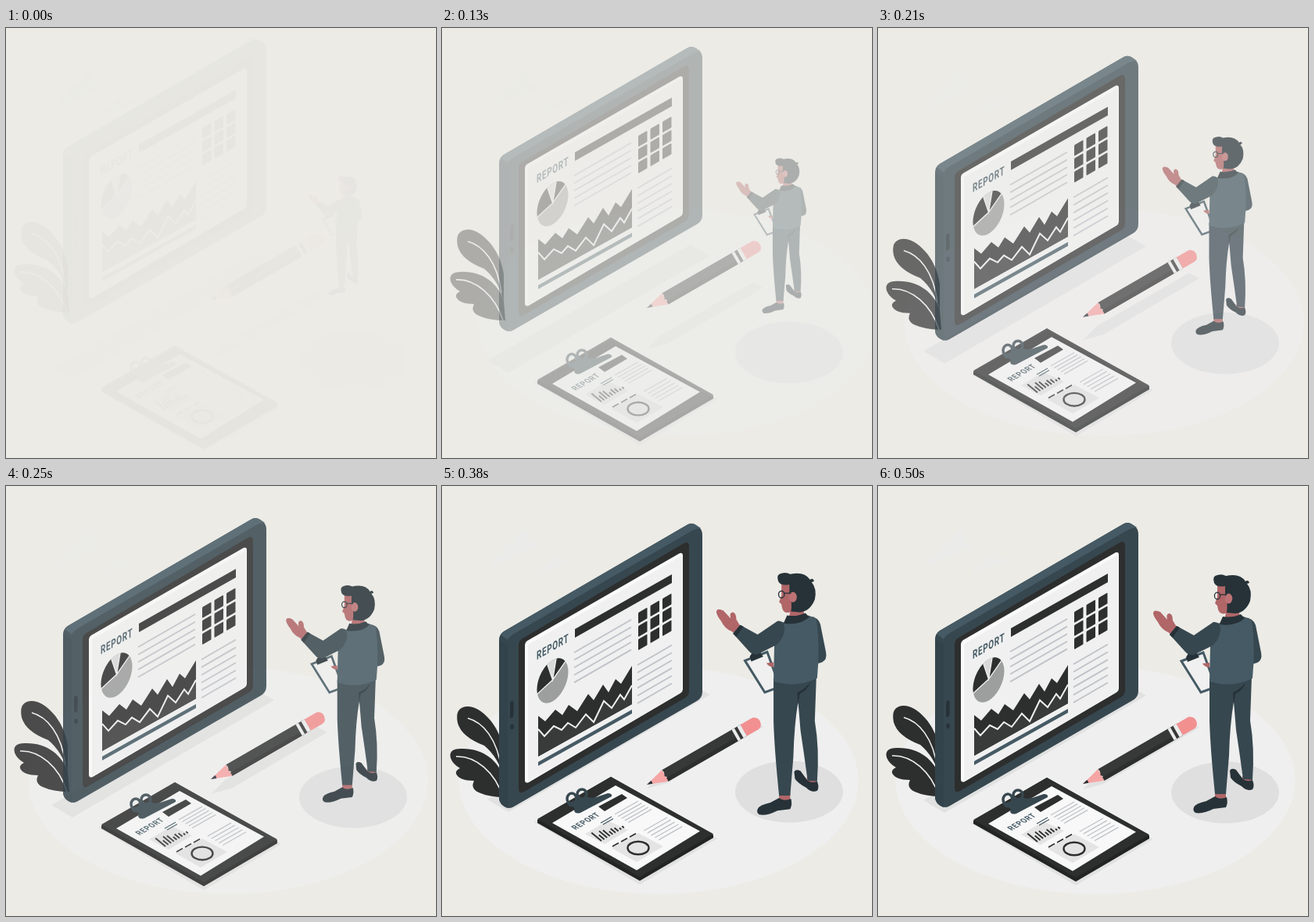
An HTML page with a canvas for the animation above (0.54 s loop, 550x550 px).

```html
<!DOCTYPE html>
<html lang="en">
<head>
<meta charset="utf-8">
<title>Report scene</title>
<style>
html, body { margin: 0; height: 100%; overflow: hidden; background: #ecebe6; }
canvas { display: block; width: 100vw; height: 100vh; }
</style>
</head>
<body>
<canvas id="stage" width="550" height="550"></canvas>
<script>
const SIZE = 550, LOOP = 540, TRAVEL = 33, ISO = 0.577;
const INK = '#2d2e2e', NAVY = '#263238', SLATE = '#37474f', STEEL = '#455a64';
const SKIN = '#b16668', PINK = '#f29090', LINE = '#bfc2c7', PAPER = '#f0f0f0';

// Each step: start time, eased progress.
const STEPS = [
  [0, 0], [40, .08], [80, .18], [130, .30], [170, .48], [210, .66], [250, .82],
  [290, .93], [330, .99], [380, 1.03], [420, 1.03], [460, 1.02], [500, 1]
];

const stage = document.getElementById('stage').getContext('2d');
const scratch = document.createElement('canvas');
scratch.width = scratch.height = SIZE;
const g = scratch.getContext('2d');

function fill(path, color) {
  g.fillStyle = color;
  g.fill(new Path2D(path));
}

function stroke(path, color, width) {
  g.strokeStyle = color;
  g.lineWidth = width;
  g.stroke(new Path2D(path));
}

function ellipse(x, y, rx, ry, color, lineWidth) {
  g.beginPath();
  g.ellipse(x, y, rx, ry, 0, 0, Math.PI * 2);
  g.fillStyle = g.strokeStyle = color;
  if (lineWidth) { g.lineWidth = lineWidth; g.stroke(); } else g.fill();
}

// Parallel lines, each moved on by (stepX, stepY).
function ruled(count, x, y, dx, dy, stepX, stepY, width) {
  for (let i = 0; i < count; i++)
    stroke(`M${x + i * stepX},${y + i * stepY} l${dx},${dy}`, LINE, width);
}

function label(size, ...matrix) {
  g.save();
  g.transform(...matrix);
  g.font = `700 ${size}px Roboto, sans-serif`;
  g.letterSpacing = '1px';
  g.fillStyle = STEEL;
  g.fillText('REPORT', 0, 0);
  g.restore();
}

function clouds() {
  const haze = '#ebebe9';
  fill('M62,104 Q64,92 76,88 Q80,70 92,72 Q98,54 110,56 Q114,64 108,72 Q122,68 120,78 Z', haze);
  fill('M121,114 Q124,102 134,102 Q140,86 150,90 Q152,96 148,98 Q164,88 168,95 Z', haze);
}

function floor() {
  ellipse(278, 376.5, 255.5, 145.5, '#efefef');
}

function shadows() {
  const shade = '#e1e1e1';
  ellipse(444, 392, 69, 39.5, '#dfdfdf');
  fill('M58,402 L85,418 L343,268 L318,254 Z', shade);
  fill('M262,388 L280,370 L398,302 L411,309 L288,381 Z', shade);
  fill('M118,431 L216,376 L352,452 L253,511 Z', shade);
}

function plant() {
  fill('M20,302 Q16,282 32,281 C48,280 74,303 79,338 L79,372 Q72,346 54,331 Q25,320 20,302 Z', INK);
  fill('M11,347 Q8,335 24,335 C52,334 72,350 79,372 L81,397 Q60,397 47,391 Q36,386 41,376 Q22,376 18,367 Q17,363 23,360 Q14,355 11,347 Z', INK);
  stroke('M33,296 C52,301 71,322 76,362', PAPER, 1.6);
  stroke('M18,345 C43,344 68,365 78,397', PAPER, 1.6);
}

function pie() {
  g.save();
  g.translate(141.5, 248);
  g.save();
  g.transform(1, -ISO, 0, 1.32, 0, 0);
  g.beginPath();
  g.arc(0, 0, 20, 0, Math.PI * 2);
  g.restore();
  g.clip();
  fill('M-40,-40 h80 v80 h-80 Z', '#9d9e9e');
  fill('M0,-1 L-40,36 L-40,-60 L-15,-45 Z', INK);
  fill('M0,-1 L-15,-45 L9,-55 Z', '#d9d9d9');
  fill('M0,-1 L9,-55 L34,-50 Z', INK);
  stroke('M-40,36 L0,-1 L34,-50 M-15,-45 L0,-1 L9,-55', PAPER, 1.3);
  g.restore();
}

function areaChart() {
  const crest = 'L132,300 L145,285 L154,292 L162,279 L173,287 L187,265 L194,273 L206,253 L213,263 L222,246 L229,252 L243,229';
  const ridge = 'M123,310 L131,319 L143,306 L153,311 L161,302 L171,308 L184,291 L194,301 L207,274 L217,283 L228,266 L233,272 L243,254';
  fill(`M123,293 ${crest} L243,278 L123,345 Z`, INK);
  fill(`${ridge} L243,278 L123,345 Z`, '#393a3a');
  stroke(ridge, PAPER, 2);
  fill('M123,352 L243,285 v5 L123,357 Z', STEEL);
}

function tablet() {
  fill('M73,196 Q73,189 79,185 L313,49 Q319,45 325,49 L329,52 Q333,55 333,62 L333,262 Q333,270 326,274 L92,409 Q86,413 80,409 Q73,405 73,398 Z', SLATE);
  fill('M73,196 L84,202 L84,411 Q73,407 73,398 Z', '#33434b');
  fill('M75,189 Q76,187 79,185 L313,49 Q319,45 325,49 L331,53 Q326,53 320,56 L92,188 Q86,192 84,196 Z', STEEL);
  fill('M98,203 Q98,197 103,194 L308,73 Q316,68 316,77 L316,261 Q316,267 311,270 L105,390 Q98,394 98,386 Z', INK);
  fill('M87,277 q2,-5 4.5,-2 v18 q-2,4 -4.5,2 Z', NAVY);
  ellipse(89.5, 307, 2.3, 3.3, NAVY);
  fill('M106,202 Q106,199 109,197 L304,85 Q308,84 308,88 L308,259 Q308,262 305,264 L111,378 Q106,380 106,375 Z', '#fafafa');
  fill('M110,202 L307,88 V259 Q307,262 304,264 L110,377 Z', PAPER);

  label(15, .66, -.38, 0, 1, 121, 221.5);
  fill('M170,182 L294,112 v11 L170,193 Z', INK);
  ruled(5, 169, 212, 73, -42, 0, 9.6, 1.8);
  ruled(6, 250, 228, 44, -25.5, 0, 9.8, 1.8);
  for (let i = 0; i < 9; i++) {
    const col = i % 3, row = Math.floor(i / 3);
    fill(`M${251 + col * 15.5},${162 - col * 9 + row * 17} q0,-1 1,-1.6 l9.5,-5.5 q1,-.5 1,.7 v11.8 q0,1 -1,1.6 l-9.5,5.5 q-1,.5 -1,-.7 Z`, INK);
  }
  pie();
  areaChart();
}

function clipboard() {
  fill('M122,428 L216,373 L347,447 V451 L253,506 L122,432 Z', '#222323');
  fill('M122,427 L216,373 L347,446 L253,501 Z', INK);
  fill('M141,432 L222,384 L330,442.5 L249,492.5 Z', '#f8f8f8');
  ellipse(166, 401, 6, 7, SLATE, 3.5);
  ellipse(179, 395, 6, 6, SLATE, 3.5);
  fill('M160,407 L184,398 Q190,401 197,399 L212,394 Q218,394 217,398 L177,419 Q170,421 169,416 Q172,411 163,411 Z', SLATE);
  label(13, .59, -.35, .72, .43, 171, 441);
  fill('M200,411 L230,395 L237,400 L208,417 Z', INK);
  ruled(5, 221, 421, 30, -17, 4.3, 2.6, 1.3);
  ruled(5, 258, 442, 30, -17, 4.8, 2.9, 1.3);

  fill('M183,446 L212,429 L238,441 L208,459 Z', '#e4e4e4');
  for (let i = 0; i < 9; i++) {
    const length = 17 * (1 - i / 10) * (i % 3 === 1 ? .6 : 1);
    stroke(`M${204 + i * 3.6},${455 - i * 2.1} l${-length * .75},${-length * .62}`, INK, 1.9);
  }
  stroke('M203,432 l14,-8 M206,434 l13,-7.5', STEEL, 1.2);
  fill('M217,464 L251,445 L283,462 L249,482 Z', '#e4e4e4');
  stroke('M218,462 l8,-4.5 M229,456 l8,-4.5 M240,450 l8,-4.5', INK, 1.7);
  ellipse(251, 464, 13.5, 8.3, INK, 2.4);
}

function pencil() {
  g.save();
  g.translate(262, 381);
  g.rotate(-Math.PI / 6);
  fill('M0,0 L26,-6.5 V10 Z', '#f6a5a5');
  fill('M0,0 L7,-1.7 Q8,0 7,2.7 Z', NAVY);
  fill('M26,-6.5 H142 V10 H26 Q29,4 25,2 Q28,-3 26,-6.5 Z', '#373838');
  fill('M26,5 H130 V10 H26 Z', INK);
  fill('M129,-6.5 h4 v16.5 h-4 Z M137,-6.5 h5 v16.5 h-5 Z', '#ececec');
  fill('M142,-6.5 H160 Q166,-4 166,2 Q165,10 159,10 H142 Z', PINK);
  g.restore();
}

function man() {
  // Held clipboard and far arm
  const board = 'M388,224 L416,213 L432,257 L413,264 Z';
  fill(board, PAPER);
  stroke(board, STEEL, 3);
  fill('M394,219 L397,214 L407,213 L411,219 L396,225 Z', NAVY);
  fill('M469,168 Q480,169 483,178 L490,213 Q492,223 485,226 L475,229 Z', SLATE);

  // Legs and shoes
  fill('M431,391 h14 v10 h-14 Z M466,371 h12 v8 h-12 Z', SKIN);
  fill('M404,411 Q406,406 420,403 L431,397 Q437,402 446,398 Q448,405 445,411 L429,413 Q415,420 406,418 Q402,415 404,411 Z', NAVY);
  fill('M450,364 Q452,360 458,363 Q463,370 467,375 Q473,379 479,376 Q482,384 479,388 Q472,391 465,384 Q455,379 451,373 Z', NAVY);
  fill('M424,246 Q450,256 478,244 L476,300 Q482,335 479,376 L467,375 Q463,345 458,312 L455,276 Q450,305 449,345 L445,394 L431,394 Q425,335 424,300 Z', SLATE);
  fill('M454,264 Q462,261 470,252 Q467,261 457,266 L455,280 Z', NAVY);

  // Sweater
  fill('M432,175 Q455,178 468,167 L478,172 Q483,205 479,246 Q453,259 424,250 L425,205 Z', STEEL);
  fill('M415,227 L424,226 V232 Q418,232 415,227 Z', SKIN);
  fill('M383,182 L377,172 Q377,163 372,163 Q368,164 370,171 L361,161 Q352,157 352,163 Q353,168 358,174 Q362,183 371,187 L375,190 Z', SKIN);
  fill('M373,190 L382,179 L404,191 L429,174 Q438,173 438,184 Q437,196 428,204 L404,216 Q397,217 393,212 Z', SLATE);
  fill('M373,190 L382,179 L386,181 L377,194 Z', NAVY);

  // Head
  fill('M434,126 L458,130 L463,169 L443,170 L445,163 Q437,165 435,158 L434,153 L431,150 L434,142 Z', SKIN);
  fill('M437,176 L441,167 Q453,169 464,164 L469,169 Q458,180 437,177 Z', NAVY);
  fill('M430,124 Q427,115 434,114 Q440,112 445,115 Q463,111 470,122 Q474,119 475,124 L472,125 Q479,133 476,147 Q470,162 457,163 L446,162 Q448,151 444,139 L444,128 Q433,130 430,124 Z', NAVY);
  ellipse(448.5, 144, 4.8, 6.5, '#bd7375');
  ellipse(434, 140.5, 3.6, 4.3, NAVY, 1.3);
  stroke('M437,139 L446,139', NAVY, 1.3);
}

function layer(draw, alpha, dx, dy, scale = 1, cx = 0, cy = 0) {
  g.setTransform(1, 0, 0, 1, 0, 0);
  g.clearRect(0, 0, SIZE, SIZE);
  g.setTransform(scale, 0, 0, scale, cx * (1 - scale) + dx, cy * (1 - scale) + dy);
  draw();
  stage.globalAlpha = alpha;
  stage.drawImage(scratch, 0, 0);
  stage.globalAlpha = 1;
}

const begin = performance.now();

function frame() {
  const time = (performance.now() - begin) % LOOP;
  const [, progress] = STEPS.findLast(([start]) => time >= start);
  const alpha = Math.min(1, progress + .025);
  const away = TRAVEL * (1 - progress);
  stage.fillStyle = '#ecebe6';
  stage.fillRect(0, 0, SIZE, SIZE);
  layer(clouds, alpha, 0, 0);
  layer(floor, alpha, away, 0);
  layer(shadows, alpha, 0, away);
  layer(plant, alpha, 0, -away);
  layer(tablet, alpha, 0, -away);
  layer(clipboard, alpha, 0, away);
  layer(pencil, alpha, 0, -away);
  layer(man, alpha, 0, 0, .5 + .5 * progress, 421, 265.5);
  requestAnimationFrame(frame);
}
frame();
</script>
</body>
</html>
```
